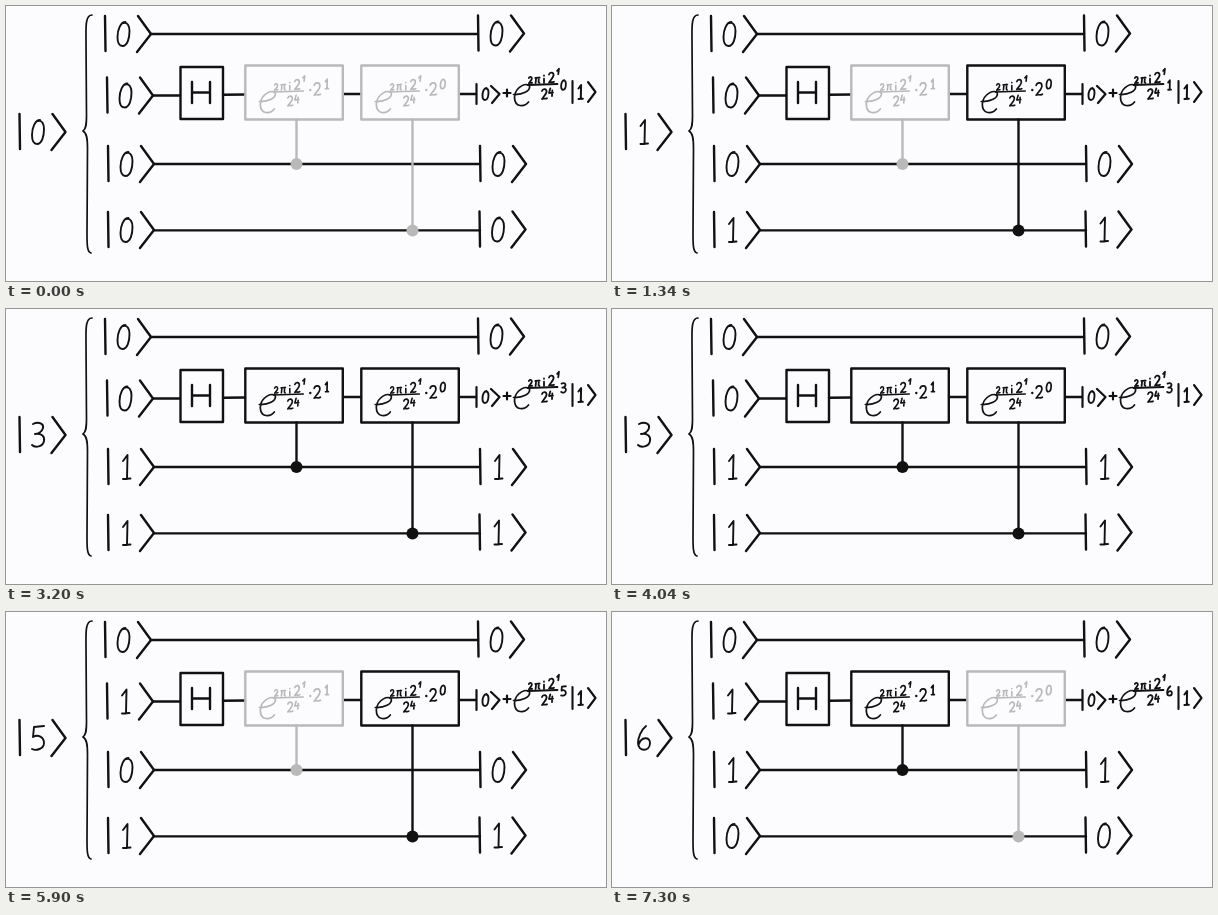
Animation, 600 px wide and 275 px high, one loop 8 s. Source, as an HTML page:

```html
<!DOCTYPE html>
<html lang="en">
<head>
<meta charset="utf-8">
<title>Quantum Fourier transform circuit</title>
<style>
  html, body { margin: 0; width: 100%; height: 100%; overflow: hidden; background: #fcfbfe; }
  svg { display: block; width: 600px; height: 275px; color: #111; }
  path { fill: none; stroke: currentColor; stroke-linecap: round; stroke-linejoin: round; vector-effect: non-scaling-stroke; }
  circle { fill: currentColor; }
  .off { color: #b9b9ba; }
</style>
</head>
<body>
<svg id="stage" viewBox="0 0 600 275" role="img" aria-label="Quantum circuit counting through its input states"></svg>
<script>
// Handwritten glyphs, centred on the origin and 24 units tall.
const GLYPHS = {
  0: 'M2-12C-3-12-6-4-6 3C-6 9-4 12-1 12C4 12 6 4 6-3C6-8 4-12 0-11',
  1: 'M-3.5-6L1-12L.5 12M-3.5 12L4 11.500',
  2: 'M-6-7C-4-14 5-13 5-6C5 0-3 7-6 12C-3 9 2 13 6 10',
  3: 'M-5-11C1-14 6-11 5-7C4-3 0-1-3-1C3-2 7 1 6 6C5 12-3 13-6 10',
  4: 'M-2-11L-6 3L6 2M4-5L3 12',
  5: 'M6-12L-4-11L-5-1C0-4 6-1 6 5C6 11-2 13-6 11',
  6: 'M2-12C-3-8-6 0-6 5C-6 14 6 14 6 5C6-2-3-1-5 6',
  pi: 'M-8-8L8-9M-5-8L-7 11M5-9L4 8L7 11',
  i: 'M0-3L0 11M0-13L0-12',
  tick: 'M-6-3L2-12L-1 12'
};
const CHANGES = [500, 1900, 3200, 4600, 5900, 7300];
const LOOP = 8000;
const stage = document.getElementById('stage');

function add(parent, tag, attrs) {
  const node = document.createElementNS('http://www.w3.org/2000/svg', tag);
  for (const key in attrs) node.setAttribute(key, attrs[key]);
  return parent.appendChild(node);
}

const line = (parent, d, width = 2.4) => add(parent, 'path', { d, 'stroke-width': width });

function glyph(parent, name, x, y, height = 24, width = 1.9) {
  return add(parent, 'path', {
    d: GLYPHS[name], 'stroke-width': width,
    transform: `translate(${x} ${y}) scale(${height / 24})`
  });
}

// Draws |0> around a bar at x and returns its digit.
function ket(x, y) {
  line(stage, `M${x} ${y - 18}L${x + .5} ${y + 17}M${x + 33} ${y - 18}L${x + 46} ${y}L${x + 32} ${y + 18}`);
  return glyph(stage, 0, x + 18.5, y);
}

// The power e^(2 pi i 2^1 / 2^4), starting at the left edge of the e.
function power(parent, x, y, ink) {
  const g = add(parent, 'g', { transform: `translate(${x} ${y})` });
  line(g, 'M0 .5C9 1 17-3 16-8C14-12 2-8 1 3C1 14 11 13 15 8', 1.7);
  line(g, 'M14-9L44-10', ink);
  glyph(g, 2, 17, -14, 6.5, ink);
  glyph(g, 'pi', 24, -14, 6.5, ink);
  glyph(g, 'i', 30.5, -14.5, 7.5, ink);
  glyph(g, 2, 38, -16.5, 10, ink);
  glyph(g, 'tick', 45, -22.5, 5.5, ink);
  glyph(g, 2, 31, 0, 10, ink);
  glyph(g, 4, 37.5, -2, 8, ink);
}

function gate(x, exponent, dotX, dotY) {
  const g = add(stage, 'g', {});
  line(g, `M${x} 59.5H${x + 97.5}V113.5H${x}Z`);
  line(g, `M${dotX} 113.500V${dotY}`);
  add(g, 'circle', { cx: dotX, cy: dotY, r: 6 });
  power(g, x + 14, 95, 1.6);
  add(g, 'circle', { cx: x + 65, cy: 84, r: 1.2 });
  glyph(g, 2, x + 72, 83, 12.5, 1.7);
  glyph(g, exponent, x + 81.5, 78, 9.5, 1.7);
  return g;
}

const total = ket(13.5, 126);
line(stage, 'M86 9C79 9 80 22 80 34L80.500 110C80.500 119 80 123 77 125C81 127 81.500 133 81.500 142L81 228C81 238 81 246 85 247', 1.7);

line(stage, 'M145 28H472M147 89.500H174M217 88.800L239 88.500M337 88H355M453 88H470M148 158H474M148 224.400H474');
ket(99, 28);
const fours = [ket(101, 89.5)];
const twos = [ket(102, 158), ket(474, 158)];
const ones = [ket(102, 224), ket(473.5, 223.5)];
ket(472, 27.5);

line(stage, 'M174.500 61H217V113H174.500Z');
line(stage, 'M186 76V97M204 76V97M186 86.500H204');
const twoGate = gate(239.3, 1, 290.5, 158);
const oneGate = gate(355.3, 0, 406.5, 224.5);

// Output of the second wire.
line(stage, 'M470.500 78V98M485 80L493.500 88L486 97M497.500 87H504.500M501 83.500V90.500', 2.2);
glyph(stage, 0, 479.5, 88, 12, 1.9);
power(stage, 507.5, 88, 1.8);
const multiple = glyph(stage, 0, 557.5, 79, 9.5, 1.8);
line(stage, 'M566.500 75V97M582 76L589.500 86L582 96', 2.1);
glyph(stage, 1, 574.5, 86, 14, 2);

function show(n) {
  const write = (nodes, digit) => nodes.forEach(node => node.setAttribute('d', GLYPHS[digit]));
  const four = n >> 2 & 1, two = n >> 1 & 1, one = n & 1;
  write([total, multiple], n);
  write(fours, four);
  write(twos, two);
  write(ones, one);
  twoGate.classList.toggle('off', !two);
  oneGate.classList.toggle('off', !one);
}

const start = performance.now();
function tick() {
  const t = (performance.now() - start) % LOOP;
  show(CHANGES.filter(at => at <= t).length);
  requestAnimationFrame(tick);
}
tick();
</script>
</body>
</html>
```
